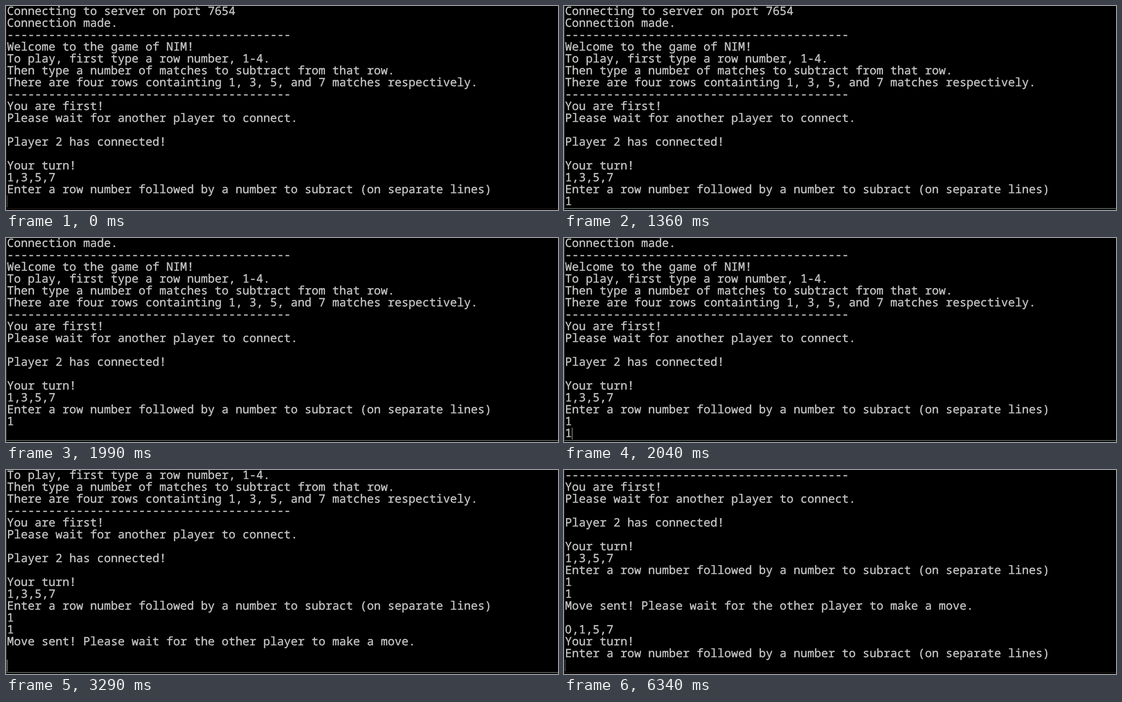
These frames come from a looping animation (1116 by 412 pixels, 8000 ms). An HTML page:

```html
<!DOCTYPE html>
<html lang="en">
<head>
<meta charset="utf-8">
<title>Terminal game</title>
<style>
  html, body { margin: 0; width: 100%; height: 100%; overflow: hidden; background: #000; }
  svg { display: block; width: 100%; height: 100%; }
  text {
    font: 23.333px "Noto Sans Mono", "DejaVu Sans Mono", monospace;
    fill: #c4c4c4; stroke: #c4c4c4; stroke-width: .45px; white-space: pre;
  }
  .zero { font-family: "Noto Sans", sans-serif; }
</style>
</head>
<body>
<svg viewBox="0 0 1116 412" shape-rendering="crispEdges" text-rendering="geometricPrecision">
  <rect width="1116" height="412"/>
  <g id="screen"></g>
  <path id="cursor" stroke="#c4c4c4"/>
  <path id="left" d="M.5 0V410"/>
  <path id="bottom"/>
</svg>
<script>
const LOOP = 8000, ROWS = 17, LINE = 24, CELL = 14, LEFT = 2, BASE = 17.5;
const RULE = "-".repeat(41);
const ASK = "Enter a row number followed by a number to subract (on separate lines)";
const LOG = [
  "Connecting to server on port 7654",
  "Connection made.",
  RULE,
  "Welcome to the game of NIM!",
  "To play, first type a row number, 1-4.",
  "Then type a number of matches to subtract from that row.",
  "There are four rows containting 1, 3, 5, and 7 matches respectively.",
  RULE,
  "You are first!",
  "Please wait for another player to connect.",
  "",
  "Player 2 has connected!",
  "",
  "Your turn!",
  "1,3,5,7",
  ASK,
  "1",
  "1",
  "Move sent! Please wait for the other player to make a move.",
  "",
  "0,1,5,7",
  "Your turn!",
  ASK,
  ""
];

// start time, first visible log line, characters on the input line, cursor
const STEPS = [
  [0, 0, 0, "hollow"],
  [500, 0, 0, "on"],
  [860, 0, 1, "on"],
  [1360, 0, 1, "off"],
  [1490, 1, 0, "on"],
  [1990, 1, 0, "off"],
  [2040, 1, 1, "on"],
  [2240, 4, 0, "on"],
  [2790, 4, 0, "off"],
  [3290, 4, 0, "on"],
  [3860, 4, 0, "off"],
  [4290, 4, 0, "hollow"],
  [6340, 7, 0, "hollow"]
];

const $ = id => document.getElementById(id);
const set = (el, attrs) => { for (const k in attrs) el.setAttribute(k, attrs[k]); };

function lineMarkup(line) {
  // plain zero, without the slash of the monospaced one
  return line[0] === "0"
    ? `<tspan class="zero">0</tspan><tspan x="${LEFT + CELL}">${line.slice(1)}</tspan>`
    : line;
}

function draw([, top, typed, cursor]) {
  const lines = LOG.slice(top, top + ROWS);
  lines[ROWS - 1] = (lines[ROWS - 1] || "").slice(0, typed);
  $("screen").innerHTML = lines.map((line, i) =>
    `<text x="${LEFT}" y="${BASE + i * LINE}">${lineMarkup(line)}</text>`).join("");

  const focused = cursor !== "hollow";
  set($("cursor"), {
    d: `M${LEFT + typed * CELL + .5} 383V407`,
    "stroke-dasharray": focused ? "none" : "1 1",
    visibility: cursor === "off" ? "hidden" : "visible"
  });
  set($("left"), { stroke: focused ? "#4c5856" : "#2c2828" });
  set($("bottom"), focused
    ? { d: "M0 409H1116", stroke: "#525c59", "stroke-width": 2 }
    : { d: "M0 409.5H1116", stroke: "#2c2424", "stroke-width": 1 });
}

let shown;
const start = performance.now();
function tick(now) {
  const t = Math.max(0, now - start) % LOOP;
  const step = STEPS.findLast(s => s[0] <= t);
  if (step !== shown) draw(shown = step);
  requestAnimationFrame(tick);
}
tick(start);
</script>
</body>
</html>
```
